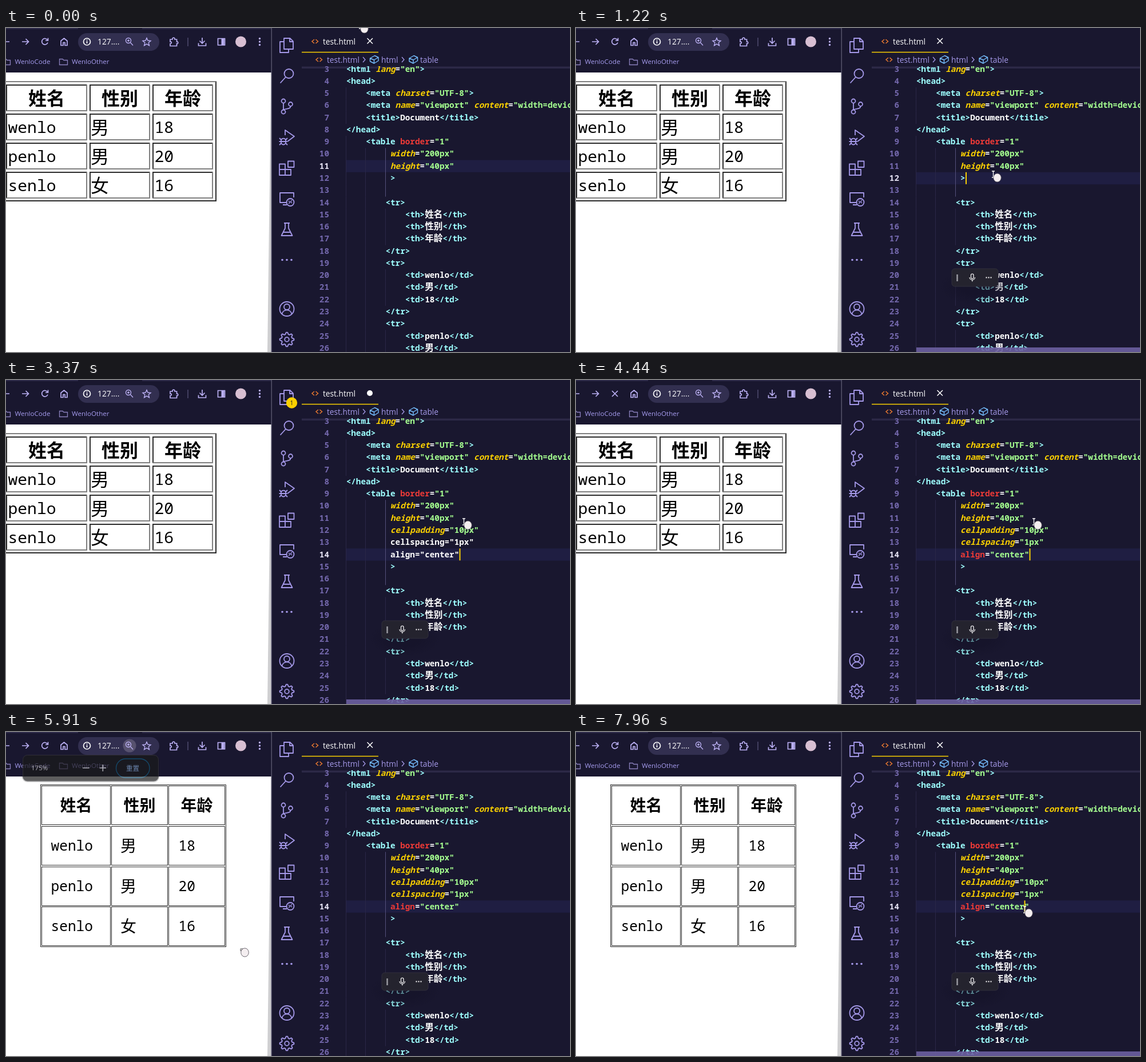
Animation of 986 by 568 pixels, one loop 8000 ms. Source, as an HTML page:

```html
<!DOCTYPE html>
<html lang="zh-CN">
<head>
<meta charset="UTF-8">
<title>Table attributes</title>
<style>
html, body { margin: 0; width: 100%; height: 100%; overflow: hidden; background: #19172f; }
svg { display: block; }
text { white-space: pre; }
.ui { font-family: "Open Sans", "Noto Sans", "Noto Sans CJK SC", sans-serif; }
.code { font: 700 14.32px "Noto Sans Mono", "DejaVu Sans Mono", monospace; }
.cell { font-family: "Noto Sans Mono", "DejaVu Sans Mono", monospace; }
.cjk { font-family: "Noto Sans CJK SC", "Noto Sans CJK", sans-serif; }
.line { fill: none; stroke: #a599e9; stroke-width: 1.8; stroke-linejoin: round; }
.chrome { fill: none; stroke: #bbb0f4; stroke-width: 1.7; }
</style>
</head>
<body>
<svg id="stage" width="986" height="568" viewBox="0 0 986 568">
  <defs>
    <clipPath id="pane"><rect x="517" y="67" width="469" height="501"/></clipPath>
    <radialGradient id="shade">
      <stop offset=".4" stop-color="#131126" stop-opacity=".5"/>
      <stop offset="1" stop-color="#131126" stop-opacity="0"/>
    </radialGradient>
  </defs>

  <!-- Editor -->
  <rect x="464" width="522" height="568" fill="#19172f"/>
  <rect x="517" y="67.500" width="469" height="3.500" fill="#2c2947"/>
  <g clip-path="url(#pane)">
    <rect id="active" x="594" width="392" height="21.3" fill="#1f1e42"/>
    <g id="code" class="code"></g>
    <rect id="caret" width="2" height="21" fill="#fad000"/>
  </g>
  <rect id="hbar" x="595" y="560" width="391" height="8" fill="#6c60a0" opacity=".9"/>
  <circle id="dot" cx="528.5" cy="305.5" r="4.3" fill="#7a1820"/>

  <path d="M517 42.5H651" stroke="#fad000" stroke-width="1.5"/>
  <g fill="none" stroke="#e8782f" stroke-width="1.5">
    <path d="M539 20l-4 3.5 4 3.5M541.500 20l4 3.500-4 3.500"/>
    <path d="M546 52l-4 3.500 4 3.500M548.500 52l4 3.500-4 3.500"/>
  </g>
  <g class="ui" font-size="13.7">
    <text x="554" y="29" fill="#fff">test.html</text>
    <g fill="#a599e9">
      <text x="561" y="61">test.html</text>
      <text x="656" y="61">html</text>
      <text x="724" y="61">table</text>
    </g>
  </g>
  <path d="M624 51l4 4.500-4 4.500M692 51l4 4.500-4 4.500" fill="none" stroke="#a599e9" stroke-width="1.3"/>
  <g fill="none" stroke="#75beff" stroke-width="1.4" stroke-linejoin="round">
    <path id="cube" d="M636.500 53l8-4.500 6.500 3v6l-7.500 4.500-7-3.500zl7 3 7.500-4.500M643.500 56v6"/>
    <use href="#cube" x="68.500"/>
  </g>
  <path id="close" d="M631.500 18l9.500 9.500M641 18l-9.500 9.500" stroke="#fff" stroke-width="1.5"/>
  <circle id="dirty" cx="636" cy="23" r="5" fill="#fff"/>

  <!-- Activity bar -->
  <g class="line">
    <path d="M486 18h10.500l5.500 5.500V37h-16zM496 18v6h6M486 24h-7v19h15v-6"/>
    <circle cx="494.500" cy="80" r="8"/><path d="M489 86l-9.500 10.500"/>
    <circle cx="485" cy="128" r="3.500"/><circle cx="497.500" cy="133.500" r="3.500"/><circle cx="485" cy="147" r="3.500"/>
    <path d="M485 131.500v12M497.500 137c0 5-6 4-12.500 6"/>
    <path d="M488 188v-9l16 11-12 9"/><path d="M481 196a4.500 4.500 0 0 1 8 0v4a4 4.500 0 0 1-8 0zM478 193l3 3M492 193l-3 3M477.500 199h14M478 205l3-3M492 205l-3-3"/>
    <path d="M478 238.500h10v9.500h10v10h-20zM478 248h10v10M493 233.500h10.500v10.500H493z"/>
    <path d="M490 306h-11v-17h24v8M484 310h7"/><circle cx="497" cy="305.500" r="6.500"/><path d="M494 303l2.500 2.500-2.500 2.500M500 302l-2.500 2.500 2.500 2.500" stroke-width="1.200"/>
    <path d="M486 342h10M488 342v9l-6.500 13h19l-6.500-13v-9M484.500 358h13"/>
    <circle cx="491" cy="492.500" r="12.500"/><circle cx="491" cy="489" r="5"/><path d="M482.500 501.500c2-9.500 15-9.500 17 0"/>
    <path id="gear"/><circle cx="491" cy="546" r="3.800"/>
  </g>
  <g fill="#a599e9"><circle cx="483" cy="406.500" r="1.800"/><circle cx="491" cy="406.500" r="1.800"/><circle cx="499" cy="406.500" r="1.800"/></g>
  <g id="badge">
    <circle cx="499.500" cy="40" r="9.700" fill="#fad000"/>
    <text class="ui" x="499.500" y="44" font-size="10.500" text-anchor="middle" fill="#222">1</text>
  </g>

  <g id="voice">
    <ellipse cx="698" cy="453" rx="62" ry="32" fill="url(#shade)"/>
    <rect x="657" y="422" width="81" height="31" rx="5" fill="#24232e" stroke="#302f3c"/>
    <path d="M666.500 432v12" stroke="#9a9aa2" stroke-width="2.500"/>
    <rect x="690.500" y="431" width="4.500" height="8.500" rx="2.200" fill="none" stroke="#fff" stroke-width="1.200"/>
    <path d="M688 437c0 6 9.500 6 9.500 0M692.800 441.500v3" fill="none" stroke="#fff" stroke-width="1.200"/>
    <path d="M716.500 437.500h2M720.500 437.500h2M724.500 437.500h2" stroke="#fff" stroke-width="1.800"/>
  </g>

  <!-- Browser -->
  <rect width="464" height="568" fill="#fff"/>
  <g id="table"></g>
  <path d="M463.500 78L457 568h7.500V78z" fill="#cfcfd1"/>
  <rect width="464" height="78" fill="#19172f"/>
  <path d="M0 1h126M238 1h226" stroke="#2d2a48" stroke-width="2"/>
  <rect x="463.500" width="1.500" height="568" fill="#55536a"/>
  <rect x="126" y="9" width="142" height="31" rx="15.500" fill="#322f50"/>
  <circle id="halo" cx="216" cy="24" r="11.500" fill="#57526f"/>
  <g class="chrome">
    <path d="M0 24h6M28 24h11M34.500 19l5 5-5 5"/>
    <path id="reload" d="M72.500 21a5.300 5.300 0 1 0 .5 4.500M73.500 17.500v4.500h-4.500"/>
    <path id="stop" d="M63 19l10 10M73 19l-10 10"/>
    <path d="M96 22.500l5.500-4.500 5.500 4.500v8h-4v-5h-3v5h-4z"/>
    <circle cx="141.500" cy="24" r="6" stroke="#fff"/><path d="M141.500 23v4M141.500 20.300v1.500" stroke="#fff"/>
    <circle cx="214" cy="22" r="4.500" stroke-width="1.400"/><path d="M217.500 25.500l4.500 5M212 22h4M214 20v4" stroke-width="1.300"/>
    <path d="M246 17.500l2 4.500 5 .5-3.800 3.300 1.200 4.900-4.400-2.600-4.400 2.600 1.200-4.900-3.800-3.300 5-.5z" stroke-width="1.400"/>
    <path d="M287 20h4c-1-4 5-4 4 0h3.500v4c3-1 3 4.500 0 3.500v4H287v-4c3 .5 3-4.500 0-3.500z"/>
    <path d="M318 17v15" stroke="#4a4668"/>
    <path d="M343 17v9.500M338.500 22.500l4.500 4.500 4.500-4.500M336.500 26.500v4.500h13v-4.500"/>
    <path d="M370.500 18.500h12v11.500h-12z"/><path d="M379 18v12" stroke-width="5"/>
    <path d="M-5 54.500h5l2 2h5.500v8H-5M93.500 54.500h5.500l2 2h6.500v8h-14z" stroke-width="1.300" stroke="#8a80bd"/>
  </g>
  <circle cx="410.500" cy="24" r="9.500" fill="#d8bfd2"/>
  <g fill="#bbb0f4"><circle cx="443.500" cy="18.500" r="1.700"/><circle cx="443.500" cy="24" r="1.700"/><circle cx="443.500" cy="29.500" r="1.700"/></g>
  <g class="ui">
    <text x="160" y="29" font-size="13.800" fill="#fff">127....</text>
    <g font-size="11.600" fill="#a79df0">
      <text x="15.500" y="63">WenloCode</text>
      <text x="115" y="63">WenloOther</text>
    </g>
  </g>

  <g id="popup" class="ui">
    <rect x="28" y="41" width="240" height="47" rx="9" fill="#000" opacity=".25"/>
    <rect x="29.500" y="40.500" width="237" height="45.500" rx="8" fill="#1a1a1b" stroke="#3a3a3c"/>
    <text x="44" y="67" font-size="11.500" fill="#eee">175%</text>
    <path d="M134 63h11.500M163.500 63h11.500M169.300 57v12" stroke="#e4e4e4" stroke-width="1.600"/>
    <rect x="192.500" y="47" width="58.500" height="33" rx="16.500" fill="none" stroke="#125f85" stroke-width="1.300"/>
    <text class="cjk" x="221.500" y="67.500" font-size="11.500" text-anchor="middle" fill="#8fb6e6">重置</text>
  </g>

  <g id="pointer">
    <path id="beam" d="M-3 -6h5M-.5 -6v11M-3 5h5" stroke="#fff" stroke-width="1.300"/>
    <path id="tip" d="M-1 -1h4l-4 4z" fill="#fff" stroke="#333" stroke-width=".8"/>
    <ellipse cx="6.500" cy="5.500" rx="6.800" ry="7.500" fill="#f4eef0" stroke="#4a4450" stroke-width=".8"/>
  </g>
</svg>
<script>
const LOOP = 8000, COL = 8.592, ROW = 21.27;
const $ = id => document.getElementById(id);
const centre = n => 72 + (n - 3) * ROW;

function add(parent, tag, attrs, text) {
  const e = document.createElementNS('http://www.w3.org/2000/svg', tag);
  for (const k in attrs) e.setAttribute(k, attrs[k]);
  if (text) e.textContent = text;
  return parent.appendChild(e);
}

// Eight-toothed cog outline: four corners per tooth
const cog = Array.from({ length: 32 }, (_, i) => {
  const a = (i - 1.5) * Math.PI / 16, r = i % 4 === 1 || i % 4 === 2 ? 12.5 : 9.3;
  return [491 + r * Math.sin(a), 546 - r * Math.cos(a)].map(v => v.toFixed(1));
});
$('gear').setAttribute('d', `M${cog.join('L')}z`);

// Source text: [indent, text]
const row = (tag, cells) => [[8, '<tr>'], ...cells.map(c => [12, `<${tag}>${c}</${tag}>`]), [8, '</tr>']];
const heads = ['姓名', '性别', '年龄'];
const people = [['wenlo', '男', '18'], ['penlo', '男', '20'], ['senlo', '女', '16']];
const before = [
  [0, '<html lang="en">'], [0, '<head>'], [4, '<meta charset="UTF-8">'],
  [4, '<meta name="viewport" content="width=device-width">'],
  [4, '<title>Document</title>'], [0, '</head>'], [4, '<table border="1"'],
  [9, 'width="200px"'], [9, 'height="40px"']
];
const after = [[9, '>'], [9, ''], ...row('th', heads), ...people.flatMap(p => row('td', p))];
const pasted = [[9, 'cellpadding="10px"'], [9, 'cellspacing="1px"'], [9, 'align="center"']];
const inserts = [[], [[9, '']], pasted, pasted];

function paint(parent, text, raw) {
  if (raw) return add(parent, 'tspan', { fill: '#fff' }, text);
  const token = /(<\/?\w+|>)|(\w+)(?==)|("[^"]*")|([\u4e00-\u9fff]+)|[a-z0-9]+|./gi;
  for (const [s, tag, attr, str, han] of text.matchAll(token)) {
    const a = { fill: tag ? '#9effff' : str ? '#a5ff90' : '#fff' };
    if (attr) {
      const old = /^(border|align)$/.test(attr);
      a.fill = old ? '#ec3a37' : '#fad000';
      if (!old) a['font-style'] = 'italic';
    }
    if (han) { a.class = 'cjk'; a['font-size'] = 15.6; }
    add(parent, 'tspan', a, s);
  }
}

function drawCode(stage, active) {
  const g = $('code'), extra = inserts[stage];
  g.textContent = '';
  [...before, ...extra, ...after].slice(0, 24).forEach(([indent, text], i) => {
    const n = i + 3, y = centre(n), base = Math.round(y + 4.6);
    for (let c = 0; c < indent; c += 4) {
      const bright = c === 8 && indent === 9;
      add(g, 'rect', { x: 594 + Math.round(c * COL), y: y - ROW / 2, width: 1, height: ROW + .3, fill: bright ? '#55507c' : '#2a2747' });
    }
    add(g, 'text', { x: 565, y: base, 'text-anchor': 'end', fill: n === active ? '#e6e3f5' : '#7468ad' }, String(n));
    paint(add(g, 'text', { x: 594.7 + indent * COL, y: base }), text, stage === 2 && (n === 13 || n === 14));
  });
  $('active').setAttribute('y', centre(active) - ROW / 2);
}

// Page layouts: outer box, columns [x, width], rows, text origins
const layouts = [
  { box: [-6, 93, 374, 211], cols: [[0, 142], [146, 106], [256, 106]], top: 99, h: 47, gap: 4, w: 2, size: 32, text: [3.5, 148, 259.5] },
  { box: [36, 93, 373, 337], cols: [[40, 137], [179, 112], [293, 112]], top: 97, h: 81, gap: 1.75, w: 2, size: 32, text: [59.5, 198, 313] },
  { box: [60, 92, 325, 285], cols: [[62, 121], [184, 99], [284, 99]], top: 94, h: 69, gap: 1.75, w: 1, size: 28, text: [78.5, 200, 301.5] }
];

function bevel(g, x, y, w, h, b, lit, dim) {
  add(g, 'path', { d: `M${x} ${y + h}V${y}H${x + w}l${-b} ${b}H${x + b}V${y + h - b}z`, fill: lit });
  add(g, 'path', { d: `M${x} ${y + h}H${x + w}V${y}l${-b} ${b}V${y + h - b}H${x + b}z`, fill: dim });
}

function drawTable(k) {
  const g = $('table'), L = layouts[k], dark = '#2c2c2c', lit = L.w === 1 ? dark : '#808080';
  g.textContent = '';
  bevel(g, ...L.box, L.w, lit, dark);
  [heads, ...people].forEach((cells, r) => {
    const y = Math.round(L.top + r * (L.h + L.gap)), mid = y + L.h / 2;
    cells.forEach((s, c) => {
      const [x, w] = L.cols[c], han = c === 1 || !r;
      bevel(g, x, y, w, L.h, L.w, dark, lit);
      add(g, 'text', {
        x: r ? L.text[c] : x + w / 2, y: Math.round(mid + L.size * (han ? .39 : .32)),
        class: han ? 'cjk' : 'cell', 'font-size': L.size * (han ? 1 : .875),
        'font-weight': r ? 400 : 700, 'text-anchor': r ? 'start' : 'middle'
      }, s);
    });
  });
}

// Step tables: [time, ...values]
const carets = [
  [0, 0], [800, 681, 12], [1390, 0], [1920, 783, 11], [2420, 0], [2860, 672, 12],
  [3370, 792.5, 14], [3890, 0], [4390, 792.5, 14], [4870, 0], [5370, 792.5, 14],
  [5870, 0], [6370, 792.5, 14], [6870, 0], [6960, 783.5, 14], [7460, 0], [7960, 783.5, 14]
];
const actives = [[0, 11], [800, 12], [1920, 11], [2860, 12], [3370, 14]];
const stages = [[0, 0], [2860, 1], [3370, 2], [3400, 3]];
const zooms = [[0, 0], [4600, 1], [5700, 2]];
const path = [
  [0, 620, -4], [140, 620, -4], [560, 730, 257], [1220, 730, 257], [1750, 801, 249],
  [5050, 801, 249], [5150, 505, 326], [5420, 411, 381], [5910, 411, 381],
  [6450, 794, 317], [6740, 794, 317], [6930, 785, 312], [LOOP, 785, 312]
];
const bar = [[0, 0], [250, 0], [400, 1], [5350, 1], [5700, 0], [6200, 0], [6350, 1], [LOOP, 1]];
const fade = [[0, 0], [5760, 0], [5910, .7], [6010, 1], [7300, 1], [7540, 0], [LOOP, 0]];

const step = (rows, t) => rows.filter(r => r[0] <= t).pop();
function mix(rows, t, smooth) {
  const i = rows.findIndex(r => r[0] > t), a = rows[i - 1], b = rows[i];
  let u = (t - a[0]) / (b[0] - a[0]);
  if (smooth) u = u * u * (3 - 2 * u);
  return a.slice(1).map((v, j) => v + (b[j + 1] - v) * u);
}
const show = (id, on) => $(id).setAttribute('opacity', +on);

let codeKey, tableKey;
function frame() {
  const t = performance.now() % LOOP;
  const between = (a, b) => t >= a && t < b;
  const stage = step(stages, t)[1], active = step(actives, t)[1], zoom = step(zooms, t)[1];
  if (codeKey !== stage + '/' + active) {
    codeKey = stage + '/' + active;
    drawCode(stage, active);
  }
  if (tableKey !== zoom) drawTable(tableKey = zoom);

  const [, cx, line] = step(carets, t);
  show('caret', cx > 0);
  if (cx) {
    $('caret').setAttribute('x', cx);
    $('caret').setAttribute('y', centre(line) - ROW / 2);
  }
  const [x, y] = mix(path, t, true), overText = x > 560;
  $('pointer').setAttribute('transform', `translate(${x} ${y})`);
  show('beam', overText);
  show('tip', !overText);

  const unsaved = between(2860, 4310), loading = between(4440, 4680);
  show('dirty', unsaved);
  show('badge', unsaved);
  show('close', !unsaved);
  show('stop', loading);
  show('reload', !loading);
  show('voice', t >= 890);
  show('dot', between(5100, 5220));
  show('halo', between(5760, 7770));
  show('popup', mix(fade, t)[0]);
  show('hbar', mix(bar, t)[0] * .9);
  requestAnimationFrame(frame);
}
frame();
</script>
</body>
</html>
```
